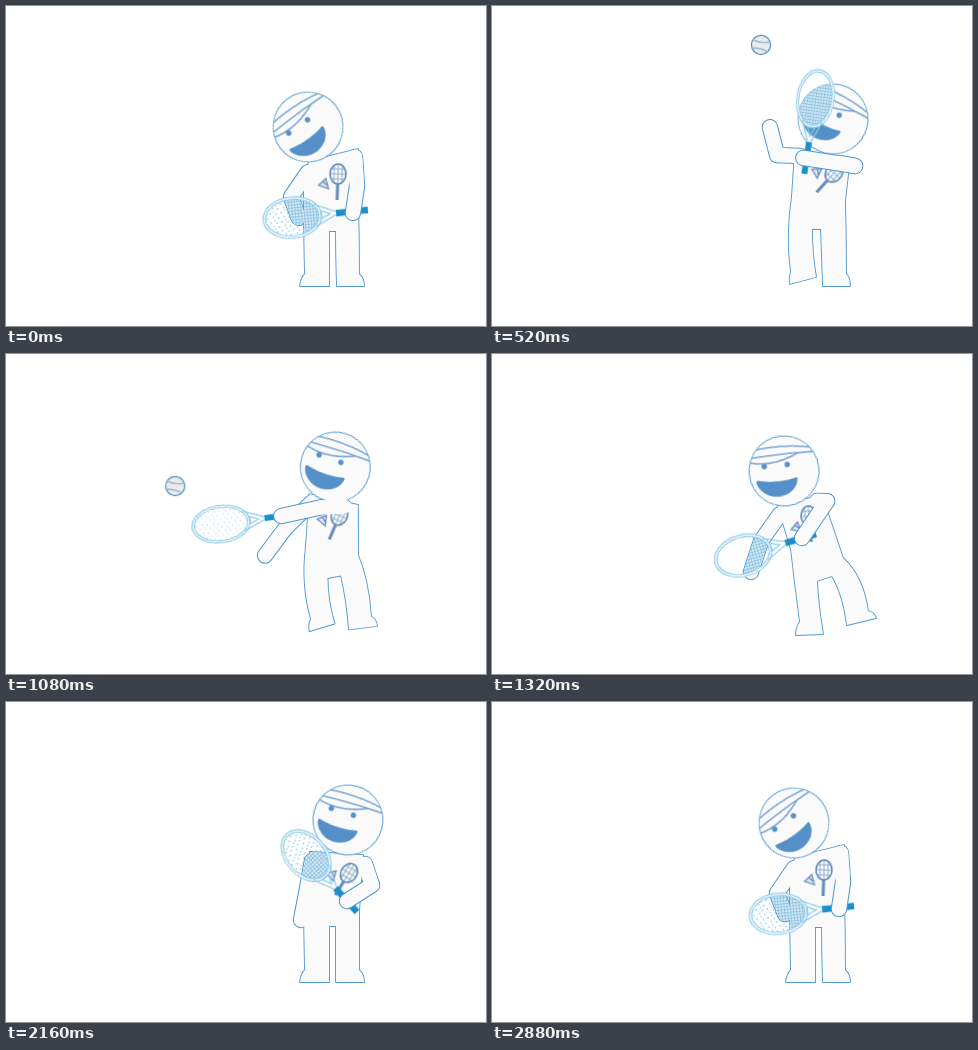
These frames come from a looping animation (480 by 320 pixels, 3.04 s). An HTML page without scripts:

```html
<!DOCTYPE html>
<html lang="en">
<head>
<meta charset="utf-8">
<title>Tennis serve</title>
<style>
html, body { margin: 0; width: 100%; height: 100%; overflow: hidden; background: #fff; }
svg { display: block; width: 480px; height: 320px; }

.torso, .armL, .upperR, .foreR, .head, .racket, .badge, .dots, .ballX, .ballY {
  animation: 3040ms linear infinite;
}
.torso { animation-name: torso; }
.armL { animation-name: armL; }
.upperR { animation-name: upperR; }
.foreR { animation-name: foreR; }
.head { animation-name: head; }
.racket { animation-name: racket; }
.badge { animation-name: badge; }
.dots { animation-name: dots; }
.ballX { animation-name: ballX; }
.ballY { animation-name: ballY; }

.edge { fill: none; stroke: #4f98d0; stroke-linecap: round; stroke-linejoin: round; stroke-width: 16.4; }
.torso.edge { stroke-width: 1.8; }
.limb { fill: none; stroke: #fafafa; stroke-linecap: round; stroke-linejoin: round; stroke-width: 14.4; }
.skin { fill: #fafafa; }
.ink { fill: none; stroke: #7ba6d3; stroke-width: 1.6; }
.blue { fill: #5590c8; }

@keyframes torso {
  0%, 94.737%, 100% { d: path("M303 155L352 143L352 195Q353 230 353 268Q358 272 358 280L331 280Q330 250 330 225L323 225Q323 250 323 280L294 280Q295 272 299 268Q298 230 298 185Z"); }
  17.105% { d: path("M303 143L357 160L353 195Q354 230 354 268Q358 271 358 280L331 280Q330 250 329 223L320 223Q320 248 324 271L298 278Q297 271 299 266Q294 230 300 190Z"); }
  27.632% { d: path("M322 130L374 160L353 198Q354 230 354 268Q358 271 358 280L331 280Q330 250 330 221L318 221Q317 243 326 259L303 273Q301 266 302 262Q287 230 301 190Z"); }
  43.421% { d: path("M285 150L330 142L351 204Q371 222 376 257Q382 258 384 264L355 271Q351 240 340 222L325 227Q326 250 331 280L304 281Q304 273 308 268Q303 230 299 195Z"); }
  53.947% { d: path("M302 152L350 146L352 205Q364 225 366 262Q371 265 371 271L343 275Q341 250 337 223L324 227Q325 250 327 280L299 281Q299 273 303 268Q300 230 298 190Z"); }
  71.053% { d: path("M304 150L357 153L353 210Q353 230 353 268Q358 272 358 280L330 280Q330 250 330 224L323 224Q323 250 323 280L294 280Q295 272 299 268Q298 230 298 190Z"); }
}
@keyframes armL {
  0%, 94.737%, 100% { d: path("M302 166L285 191L293 212"); }
  5.263% { d: path("M303 160L276 184L250 190"); }
  9.211% { d: path("M305 155L284 155L270 124"); }
  17.105% { d: path("M308 150L285 149L278 121"); }
  27.632% { d: path("M323 137L290 161L259 185"); }
  43.421% { d: path("M288 160L269 187L259 218"); }
  53.947% { d: path("M301 160L279 186L256 213"); }
  71.053% { d: path("M306 159L301 187L295 218"); }
}
@keyframes upperR {
  0%, 94.737%, 100% { d: path("M349 151L351 180"); }
  17.105% { d: path("M348 157L363 160"); }
  27.632% { d: path("M364 160L379 143"); }
  31.579% { d: path("M350 157L357 148"); }
  36.842% { d: path("M334 151L302 155"); }
  43.421% { d: path("M325 147L335 147"); }
  53.947% { d: path("M349 154L350 179"); }
  71.053% { d: path("M359 162L366 183"); }
}
@keyframes foreR {
  0%, 94.737%, 100% { d: path("M351 180L347 207"); }
  17.105% { d: path("M363 160L311 152"); }
  27.632% { d: path("M379 143L412 131"); }
  31.579% { d: path("M357 148L323 140"); }
  36.842% { d: path("M302 155L260 169"); }
  43.421% { d: path("M335 147L310 184"); }
  53.947% { d: path("M350 179L328 193"); }
  71.053% { d: path("M366 183L341 199"); }
}
@keyframes head {
  0%, 94.737%, 100% { transform: translate(302px, 121px) rotate(-38deg); }
  17.105% { transform: translate(341px, 113px) rotate(25deg); }
  27.632% { transform: translate(367px, 109px) rotate(41deg); }
  43.421% { transform: translate(292px, 117px) rotate(-8deg); }
  53.947% { transform: translate(316px, 116px) rotate(1deg); }
  71.053% { transform: translate(342px, 118px) rotate(15deg); }
}
@keyframes racket {
  0%, 94.737%, 100% { transform: translate(362px, 204px) rotate(174deg) scale(1, 1); }
  17.105% { transform: translate(312px, 168px) rotate(278deg) scale(1, .9); }
  27.632% { transform: translate(404px, 121px) rotate(417deg) scale(1, 1); }
  31.579% { transform: translate(338px, 144px) rotate(195deg) scale(1, .9); }
  36.842% { transform: translate(275px, 165px) rotate(165deg) scale(1, .9); }
  43.421% { transform: translate(324px, 180px) rotate(163.5deg) scale(1, 1); }
  53.947% { transform: translate(341px, 195px) rotate(192deg) scale(1, 1); }
  71.053% { transform: translate(351px, 210px) rotate(228deg) scale(1, 1); }
}
@keyframes badge {
  0%, 94.737%, 100% { transform: translate(332px, 168px) rotate(2deg); }
  17.105% { transform: translate(342px, 167px) rotate(42deg); }
  27.632% { transform: translate(350px, 161px) rotate(51deg); }
  43.421% { transform: translate(317px, 162px) rotate(-5deg); }
  53.947% { transform: translate(331px, 168px) rotate(14deg); }
  71.053% { transform: translate(343px, 171px) rotate(32deg); }
}
@keyframes dots {
  0%, 27.632%, 71.053%, 100% { opacity: 1; }
  17.105%, 43.421%, 53.947% { opacity: 0; }
}
/* toss, free fall, then the hit */
@keyframes ballX {
  0% { transform: translateX(308px); }
  5.263% { transform: translateX(240px); }
  9.211% { transform: translateX(271px); }
  17.105% { transform: translateX(269px); }
  27.632% { transform: translateX(265px); }
  31.579% { transform: translateX(263px); }
  43.421%, 100% { transform: translateX(-16px); }
}
@keyframes ballY {
  0% { transform: translateY(210px); }
  5.263% { transform: translateY(182px); }
  9.211% { transform: translateY(113px); animation-timing-function: cubic-bezier(.333, .667, .667, 1); }
  20.066% { transform: translateY(33px); animation-timing-function: cubic-bezier(.333, 0, .667, .333); }
  31.579% { transform: translateY(123px); }
  43.421%, 100% { transform: translateY(150px); }
}
</style>
</head>
<body>
<svg viewBox="0 0 480 320" xmlns="http://www.w3.org/2000/svg">
  <defs>
    <pattern id="net" width="3" height="3" patternUnits="userSpaceOnUse">
      <rect width="3" height="3" fill="#d3e8f4"/>
      <path d="M0 .5H3M.5 0V3" stroke="#8fc3e2" stroke-width=".9"/>
    </pattern>
    <pattern id="specks" width="11" height="9" patternUnits="userSpaceOnUse">
      <path d="M1 1h1.4M6 2h1.2M3 5h1.2M9 6h1.4M5 8h1" stroke="#3fa9d8" stroke-width="1.2"/>
    </pattern>
    <clipPath id="face"><circle r="35"/></clipPath>
    <clipPath id="oval"><ellipse rx="8" ry="10"/></clipPath>
    <mask id="figure" maskUnits="userSpaceOnUse" x="0" y="0" width="480" height="320">
      <path class="torso skin"/>
      <path class="armL limb"/>
      <path class="upperR limb"/>
      <g class="head"><circle class="skin" r="35"/></g>
    </mask>
  </defs>

  <g class="racket"><ellipse class="dots" cx="76" rx="26" ry="18" fill="url(#specks)"/></g>

  <g class="ballX"><g class="ballY">
    <circle r="9.6" fill="#e9ebed" stroke="#4f93c4" stroke-width="1.2"/>
    <path d="M-8 -5Q0 -1 9 -3M-9 3Q0 3 7 7" fill="none" stroke="#9fb9cd" stroke-width="1.4"/>
  </g></g>

  <path class="armL edge"/>
  <path class="upperR edge"/>
  <path class="torso edge"/>
  <path class="torso skin"/>
  <path class="armL limb"/>
  <path class="upperR limb"/>

  <g class="badge">
    <g clip-path="url(#oval)">
      <path d="M-4 -10V10M0 -10V10M4 -10V10M-8 -5H8M-8 0H8M-8 5H8" fill="none" stroke="#8eabcd" stroke-width="1"/>
    </g>
    <ellipse rx="8" ry="10" fill="none" stroke="#6489b8" stroke-width="1.6"/>
    <path d="M0 10V26" stroke="#6489b8" stroke-width="3"/>
    <path d="M-19 12L-12 5L-9 15ZM-15 8L-10 12" fill="#dce7f2" stroke="#6489b8" stroke-width="1.2"/>
  </g>

  <g class="head">
    <circle r="35" fill="#fafafa" stroke="#4f98d0"/>
    <g class="ink" clip-path="url(#face)">
      <path d="M-30 -24Q0 -28 34 -19"/>
      <path d="M-34 -17Q0 -18 36 -15"/>
      <path d="M-34 -13Q-12 -5 16 -16"/>
    </g>
    <circle class="blue" cx="-19" cy="-7" r="2.7"/>
    <circle class="blue" cx="4" cy="-6" r="2.7"/>
    <path class="blue" d="M-28 6Q-8 12 11 8Q13 8 12 11C7 29 -23 30 -29 9Q-29 6 -28 6Z"/>
  </g>

  <g mask="url(#figure)">
    <g class="racket"><ellipse cx="76" rx="28" ry="19.5" fill="url(#net)"/></g>
  </g>
  <g class="racket" fill="none">
    <ellipse cx="76" rx="28" ry="19.5" stroke="#7fc4e6" stroke-width="3.6"/>
    <ellipse cx="76" rx="28" ry="19.5" stroke="#e6f4fb" stroke-width="1.8"/>
    <path d="M32 -1.5L53 -11M32 1.5L53 11M38 0L47 -4V4Z" stroke="#8ccae8" stroke-width="1.3"/>
    <path d="M0 0H32" stroke="#1d8fc8" stroke-width="6.6"/>
  </g>

  <path class="foreR edge"/>
  <path class="upperR limb"/>
  <path class="foreR limb"/>
</svg>
</body>
</html>
```
